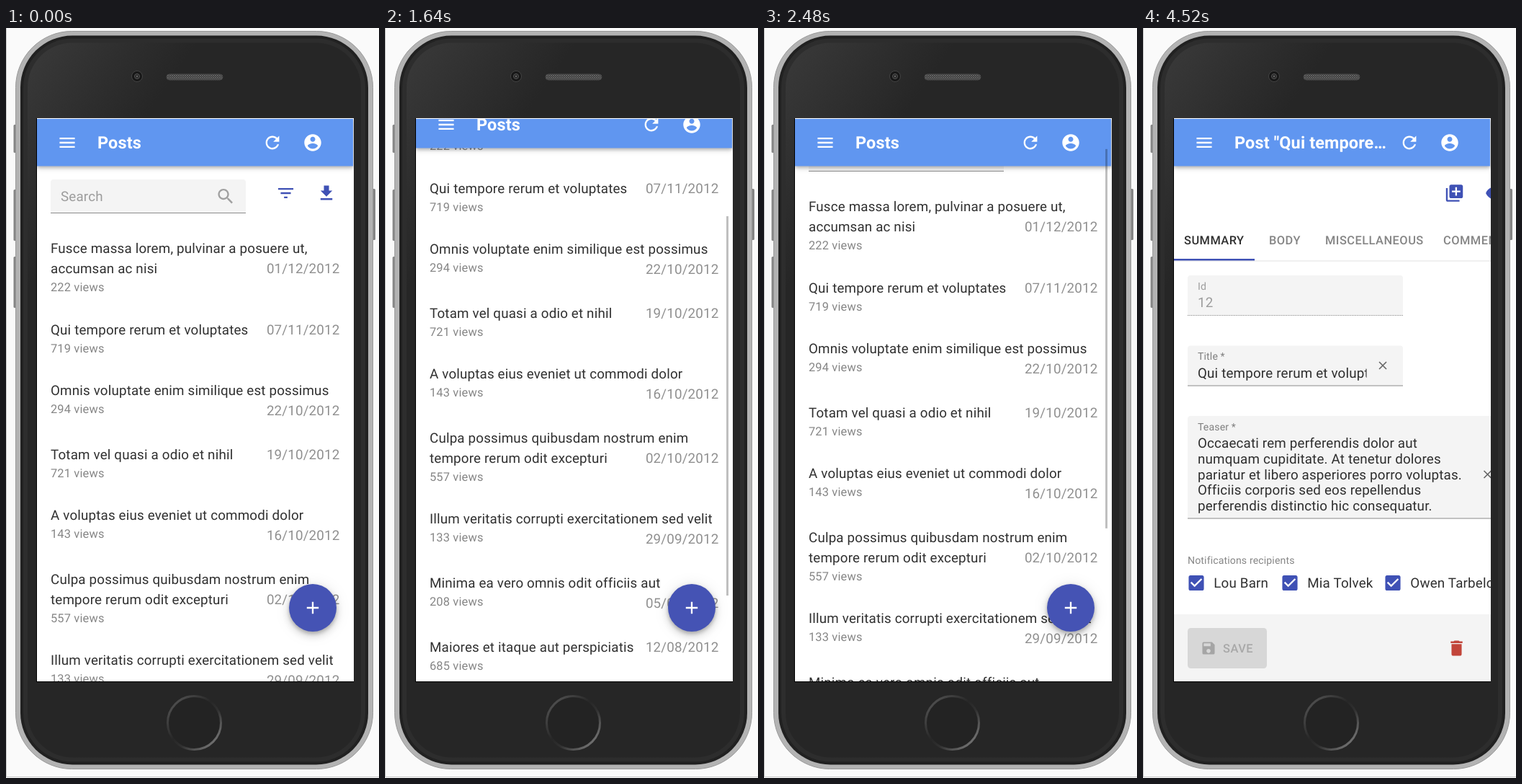
An HTML page for the animation above (5.3 s loop, 518 by 1040 pixels).

```html
<!DOCTYPE html>
<html lang="en">
<head>
<meta charset="utf-8">
<title>Posts on a phone</title>
<style>
html, body { margin: 0; width: 100%; height: 100%; overflow: hidden; background: #fafafa; }
svg { display: block; width: 518px; height: 1040px; font-family: Roboto, "Open Sans", sans-serif; }
text { white-space: pre; text-rendering: geometricPrecision; }
#bar { filter: drop-shadow(0 2px 2px rgba(0,0,0,.18)) drop-shadow(0 3px 3px rgba(0,0,0,.16)); }
#fab { filter: drop-shadow(0 3.5px 2.5px rgba(0,0,0,.2)) drop-shadow(0 5px 6px rgba(0,0,0,.14)) drop-shadow(0 1px 9px rgba(0,0,0,.1)); }
</style>
</head>
<body>
<svg viewBox="0 0 518 1040">
  <defs>
    <linearGradient id="sheen" gradientUnits="userSpaceOnUse" x1="30" y1="20" x2="190" y2="130">
      <stop stop-color="#3a3a3a"/><stop offset="1" stop-color="#262626"/>
    </linearGradient>
    <linearGradient id="ring" x1="0" y1="0" x2="1" y2="1">
      <stop offset=".1" stop-color="#505050"/><stop offset=".45" stop-color="#272727"/>
      <stop offset=".6" stop-color="#303030"/><stop offset=".9" stop-color="#777"/>
    </linearGradient>
    <pattern id="mesh" width="3" height="3" patternUnits="userSpaceOnUse">
      <rect width="3" height="3" fill="#3a3a3a"/><path d="M0 0l3 3M3 0l-3 3" stroke="#707070" stroke-width=".7"/>
    </pattern>
    <clipPath id="screen"><path d="M43 126h440v780h-440z"/></clipPath>
    <clipPath id="field"><path d="M62 441h248.5v55h-248.5z"/></clipPath>
  </defs>

  <path d="M.5 0v1038.5H518" fill="none" stroke="#c9c9c9"/>
  <g fill="#858585">
    <rect x="10.5" y="134" width="5" height="39" rx="1.5"/><rect x="10.5" y="224" width="5" height="71" rx="1.5"/>
    <rect x="10.5" y="317" width="5" height="71" rx="1.5"/><rect x="508" y="223" width="5" height="71" rx="1.5"/>
  </g>
  <rect x="13.500" y="4.500" width="496" height="1023" rx="78" fill="#b3b3b3" stroke="#999"/>
  <rect x="20" y="10.500" width="483" height="1011" rx="72" fill="#212121"/>
  <rect x="24" y="14.500" width="475" height="1003" rx="68" fill="#2d2d2d"/>
  <rect x="30" y="20.500" width="463" height="991" rx="62" fill="url(#sheen)"/>
  <circle cx="182" cy="67" r="7.500" fill="#171717" stroke="#444"/>
  <circle cx="182" cy="67" r="3.500" fill="#282828" stroke="#555"/>
  <circle cx="182" cy="67" r="1.200" fill="#666"/>
  <rect x="223" y="64" width="78" height="8" rx="4" fill="url(#mesh)" stroke="#484848"/>
  <circle cx="261.500" cy="963.500" r="37" fill="#232323" stroke="url(#ring)" stroke-width="3"/>
  <path d="M42 125h441v782h-441z" fill="#000"/>
  <path d="M43 125h440v781h-440z" fill="#fff"/>

  <g clip-path="url(#screen)">
    <g id="list"></g>
    <g id="edit"></g>
    <g id="bar"></g>
    <g id="fab"></g>
    <rect id="thumb" x="474" width="3" height="526" fill="#000"/>
    <circle id="touch" r="16" fill="#555" fill-opacity=".42" stroke="#666" stroke-opacity=".5"/>
  </g>
  <path id="arrow" d="M0 0v17l4-4 3 6 2.500-1.200-3-5.800h5.500z" fill="#fff" stroke="#000"/>
</svg>
<script>
const LOOP = 5300, SCALE = 440 / 375;
const BODY = 16 * SCALE, SMALL = 14 * SCALE, CAPTION = 12 * SCALE;
const INK = 'rgba(0,0,0,.81)', DIM = 'rgba(0,0,0,.48)', FAINT = 'rgba(0,0,0,.36)', BLUE = '#3f51b5';
const $ = id => document.getElementById(id);

// y is the middle of the line
const text = (x, y, str, size = BODY, fill = INK, extra = '') =>
  `<text x="${x}" y="${y + size * .35}" font-size="${size}" fill="${fill}" letter-spacing="${size * .0094}" ${extra}>${str}</text>`;
const caps = (x, y, str, fill) => text(x, y, str, SMALL, fill, 'font-weight="500" style="letter-spacing:.0286em"');
const icon = (x, y, d, fill, k = SCALE) =>
  `<path transform="translate(${x} ${y}) scale(${k}) translate(-12 -12)" d="${d}" fill="${fill}"/>`;
const box = (x, y, w, h, fill, rx = 0) => `<rect x="${x}" y="${y}" width="${w}" height="${h}" fill="${fill}" rx="${rx}"/>`;
const line = (d, stroke, extra = '') => `<path d="${d}" stroke="${stroke}" fill="none" ${extra}/>`;
const field = (x, y, w, h, extra) =>
  `<path d="M${x} ${y + h}v${4 - h}q0-4 4-4h${w - 8}q4 0 4 4v${h - 4}z" fill="#f4f4f4"/>` +
  line(`M${x} ${y + h - .5}h${w}`, '#8c8c8c', extra);
const cross = (x, y) => line(`M${x - 5} ${y - 5}l10 10m0-10l-10 10`, '#666', 'stroke-width="1.6"');

const ICONS = {
  menu: 'M3 18h18v-2H3v2zm0-5h18v-2H3v2zm0-7v2h18V6H3z',
  refresh: 'M17.65 6.35C16.2 4.9 14.21 4 12 4c-4.42 0-7.99 3.58-7.99 8s3.57 8 7.99 8c3.73 0 6.84-2.55 7.73-6h-2.08c-.82 2.33-3.04 4-5.65 4-3.31 0-6-2.69-6-6s2.69-6 6-6c1.66 0 3.14.69 4.22 1.78L13 11h7V4l-2.35 2.35z',
  account: 'M12 2C6.48 2 2 6.48 2 12s4.48 10 10 10 10-4.48 10-10S17.52 2 12 2zm0 3c1.66 0 3 1.34 3 3s-1.34 3-3 3-3-1.34-3-3 1.34-3 3-3zm0 14.200c-2.500 0-4.710-1.280-6-3.220.03-1.990 4-3.080 6-3.080 1.990 0 5.970 1.090 6 3.080-1.290 1.940-3.500 3.220-6 3.220z',
  search: 'M15.500 14h-.79l-.28-.27C15.410 12.590 16 11.110 16 9.500 16 5.910 13.090 3 9.500 3S3 5.910 3 9.500 5.910 16 9.500 16c1.610 0 3.090-.59 4.230-1.570l.27.28v.79l5 4.990L20.490 19l-4.990-5zm-6 0C7.010 14 5 11.990 5 9.500S7.010 5 9.500 5 14 7.010 14 9.500 11.990 14 9.500 14z',
  filter: 'M10 18h4v-2h-4v2zM3 6v2h18V6H3zm3 7h12v-2H6v2z',
  download: 'M19 9h-4V3H9v6H5l7 7 7-7zM5 18v2h14v-2H5z',
  plus: 'M19 13h-6v6h-2v-6H5v-2h6V5h2v6h6v2z',
  clone: 'M4 6H2v14c0 1.100.9 2 2 2h14v-2H4V6zm16-4H8c-1.100 0-2 .9-2 2v12c0 1.100.9 2 2 2h12c1.100 0 2-.9 2-2V4c0-1.100-.9-2-2-2zm-1 9h-4v4h-2v-4H9V9h4V5h2v4h4v2z',
  eye: 'M12 4.500C7 4.500 2.730 7.610 1 12c1.730 4.390 6 7.500 11 7.500s9.270-3.110 11-7.500C21.270 7.610 17 4.500 12 4.500z',
  check: 'M19 3H5c-1.110 0-2 .9-2 2v14c0 1.100.89 2 2 2h14c1.110 0 2-.9 2-2V5c0-1.100-.89-2-2-2zm-9 14l-5-5 1.410-1.410L10 14.170l7.590-7.590L19 8l-9 9z',
  save: 'M17 3H5c-1.110 0-2 .9-2 2v14c0 1.100.89 2 2 2h14c1.100 0 2-.9 2-2V7l-4-4zm-5 16c-1.660 0-3-1.340-3-3s1.340-3 3-3 3 1.340 3 3-1.340 3-3 3zm3-10H5V5h10v4z',
  bin: 'M6 19c0 1.100.9 2 2 2h8c1.100 0 2-.9 2-2V7H6v12zM19 4h-3.500l-1-1h-5l-1 1H5v2h14V4z'
};

// y, views, date, title lines, date pushed to the next line
const POSTS = [
  [305.5, 222, '01/12', ['Fusce massa lorem, pulvinar a posuere ut,', 'accumsan ac nisi'], 1],
  [418.5, 719, '07/11', ['Qui tempore rerum et voluptates'], 0],
  [502.5, 294, '22/10', ['Omnis voluptate enim similique est possimus'], 1],
  [591.5, 721, '19/10', ['Totam vel quasi a odio et nihil'], 0],
  [675.5, 143, '16/10', ['A voluptas eius eveniet ut commodi dolor'], 1],
  [764.5, 557, '02/10', ['Culpa possimus quibusdam nostrum enim', 'tempore rerum odit excepturi'], 1],
  [876.5, 133, '29/09', ['Illum veritatis corrupti exercitationem sed velit'], 1],
  [965.5, 208, '05/09', ['Minima ea vero omnis odit officiis aut'], 1],
  [1054.5, 685, '12/08', ['Maiores et itaque aut perspiciatis'], 0],
  [1138.5, 563, '08/08', ['Sint dignissimos in architecto aut'], 0]
];

$('list').innerHTML = field(62, 210, 271, 47) + text(76, 233.5, 'Search', BODY, FAINT) +
  icon(305, 233.5, ICONS.search, '#a0a0a0') + icon(388.5, 229, ICONS.filter, BLUE) + icon(445, 229, ICONS.download, BLUE) +
  POSTS.map(([y, views, date, lines, low]) =>
    lines.map((s, i) => text(62, y + 28 * i, s)).join('') +
    text(62, y + 28 * lines.length - 2, views + ' views', SMALL, DIM) +
    text(463.5, y + 28 * low, date + '/2012', BODY, 'rgba(0,0,0,.44)', 'text-anchor="end"')).join('');

$('edit').innerHTML = box(43, 126, 440, 780, '#fff') +
  icon(432.5, 229, ICONS.clone, BLUE) + icon(489, 229, ICONS.eye, BLUE) +
  caps(57, 294.5, 'SUMMARY', INK) + caps(175, 294.5, 'BODY', DIM) +
  caps(253, 294.5, 'MISCELLANEOUS', DIM) + caps(417, 294.5, 'COMMENTS', DIM) +
  line('M43 323h440', '#e0e0e0') + box(43, 320, 112, 2.5, BLUE) +
  field(62, 343, 299, 56, 'stroke-dasharray="1.2 1.2"') +
  text(76, 358, 'Id', CAPTION, FAINT) + text(76, 380.5, '12', BODY, FAINT) +
  field(62, 440.5, 299, 56) + text(76, 455.5, 'Title *', CAPTION, DIM) +
  `<g clip-path="url(#field)">${text(76, 478.5, 'Qui tempore rerum et voluptates')}</g>` + cross(333, 468) +
  field(62, 538, 440, 142.5) + text(76, 553, 'Teaser *', CAPTION, DIM) +
  ['Occaecati rem perferendis dolor aut', 'numquam cupiditate. At tenetur dolores',
   'pariatur et libero asperiores porro voluptas.', 'Officiis corporis sed eos repellendus',
   'perferendis distinctio hic consequatur.'].map((s, i) => text(76, 575.5 + 21.8 * i, s)).join('') + cross(478.5, 619) +
  text(62, 738, 'Notifications recipients', CAPTION, DIM) +
  [[74, 'Lou Barn'], [204, 'Mia Tolvek'], [347, 'Owen Tarbelow']].map(([x, name]) =>
    icon(x, 769.5, ICONS.check, BLUE) + text(x + 24.3, 769.5, name)).join('') +
  box(43, 813, 440, 93, '#f4f4f4') + box(62, 832, 110, 56, '#d7d7d7', 4.5) +
  icon(91, 860, ICONS.save, '#a5a5a5', .95) + caps(111, 860, 'SAVE', '#a8a8a8') + icon(435.5, 860, ICONS.bin, '#c2453a');

$('bar').innerHTML = box(43, 126, 439, 65.5, '#6096f0') + icon(85, 159, ICONS.menu, '#fff') +
  text(127, 159, 'Posts', 20 * SCALE, '#fff', 'id="title" font-weight="600" style="letter-spacing:.005em"') +
  icon(370, 159, ICONS.refresh, '#fff') + icon(426, 159, ICONS.account, '#fff');

$('fab').innerHTML = `<circle cx="426" cy="804" r="33" fill="#4553b4"/>` + icon(426, 804, ICONS.plus, '#fff');

const TICKS = [0, 360, 440, 530, 1250, 1330, 1400, 1480, 1560, 1640, 1710, 1790, 1860, 1940,
  2320, 2400, 2480, 2550, 2720, 2870, 2960, 3110, 3430, 3500, 3820, 3890, 4120, 4290];
const SCROLL = [[1240, 0], [1250, 2], [1400, 68], [1640, 196], [1790, 276], [1940, 292], [2285, 292], [2320, 252], [2480, 58], [2550, 0]];
const HIDE = [[1560, 0], [1640, 25], [1710, 58], [1790, 78], [2285, 78], [2320, 39], [2400, 6], [2480, 0]];
// start, end, x, y
const TOUCHES = [[2720, 2870, 285, 873], [3430, 3500, 236, 482], [3820, 4120, 239.5, 431]];

function track(keys, t) {
  const i = keys.findIndex(k => k[0] > t);
  if (i < 1) return i ? keys.at(-1)[1] : keys[0][1];
  const [[t0, a], [t1, b]] = [keys[i - 1], keys[i]];
  return a + (b - a) * (t - t0) / (t1 - t0);
}
const show = (id, on) => $(id).style.display = on ? '' : 'none';
const move = (id, x, y) => $(id).setAttribute('transform', `translate(${x} ${y})`);

function draw(now) {
  const t = TICKS.findLast(k => k <= now % LOOP);
  const scroll = track(SCROLL, t), editing = t >= 4290;
  move('list', 0, -Math.round(scroll));
  move('bar', 0, -track(HIDE, t));
  show('list', !editing);
  show('fab', !editing);
  show('edit', editing);
  $('title').textContent = editing ? 'Post "Qui tempore…' : 'Posts';

  show('thumb', t >= 1250 && t < 3110);
  $('thumb').setAttribute('y', 128.7 + scroll * .675);
  $('thumb').setAttribute('opacity', track([[2720, .25], [2870, .16], [2960, .06]], t));

  const touch = TOUCHES.find(([from, to]) => t >= from && t < to);
  show('touch', touch);
  if (touch) move('touch', touch[2], touch[3]);

  show('arrow', t >= 360 && t < 530);
  move('arrow', track([[360, 394], [440, 368.5]], t), track([[360, 1014], [440, 952.5]], t));
  requestAnimationFrame(draw);
}
draw(0);
</script>
</body>
</html>
```
